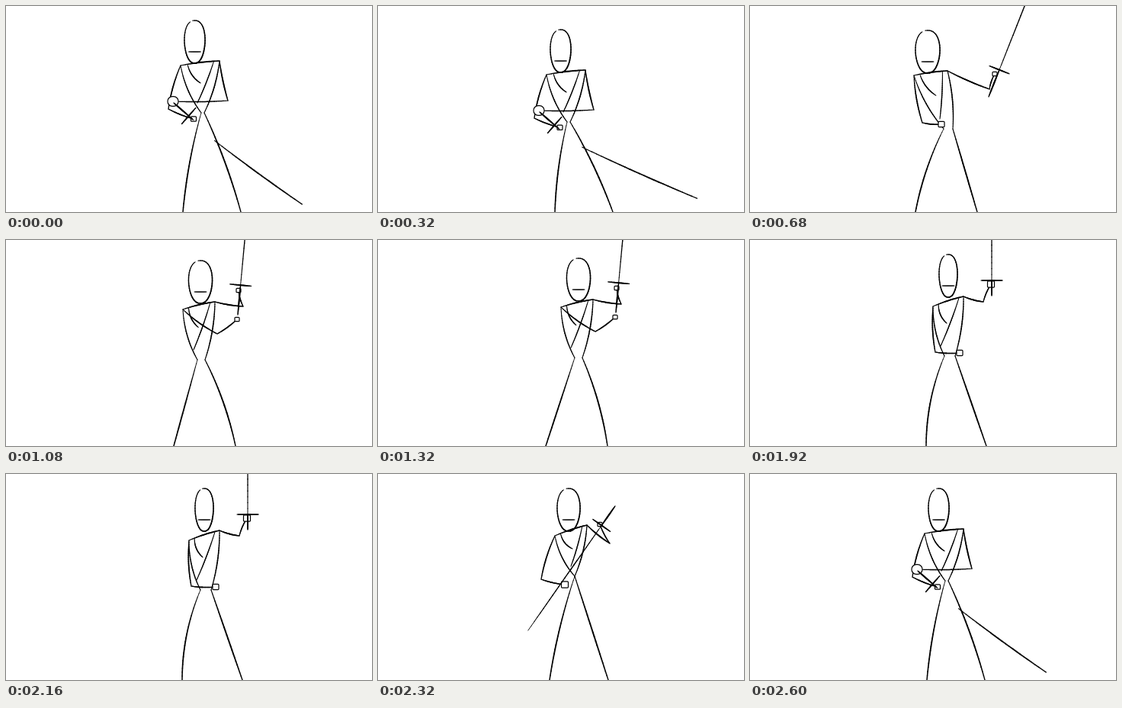
Animation of 480x270 px, one loop 2640 ms. Source, as an HTML page with a canvas:

```html
<!DOCTYPE html>
<html lang="en">
<head>
<meta charset="utf-8">
<title>Sword practice</title>
<style>
  html, body { margin: 0; width: 100%; height: 100%; overflow: hidden; background: #fff; }
  canvas { display: block; width: 480px; height: 270px; }
</style>
</head>
<body>
<canvas id="stage" width="480" height="270"></canvas>
<script>
const ctx = document.getElementById('stage').getContext('2d');
const LOOP = 2640, FLOOR = 270;

// A pose is a few joints; every stroke is derived from them.
// head: x, y, half width       hip: x, y, half spread
// handL, handR: x, y, size     legL, legR: foot x, outward bend
// sheath: degrees, length      sword: pommel x, y, degrees, grip, length
const rest = {
  head: [247.5, 47, 13.5], shoulderL: [229, 78], shoulderR: [280, 72], hip: [258, 140, 2],
  elbowL: [213, 135], handL: [246, 148, 7], elbowR: [291, 124], handR: [219, 125, 14],
  legL: [232, 3], legR: [308, 3], sheath: [36, 142], sword: [220, 127, 41, 26, 34],
};
const lunge = {
  head: [233, 60, 16], shoulderL: [215, 91], shoulderR: [259, 85], hip: [260, 161, 6],
  elbowL: [226, 153], handL: [251, 155, 8], elbowR: [314, 109], handR: [321, 89, 6],
  legL: [217, 4], legR: [298, 0], sheath: [36, 0], sword: [313, 119, 291.6, 38, 205],
};
const raise = {
  head: [255, 55, 15.5], shoulderL: [232, 91], shoulderR: [274, 81], hip: [256, 157, 5],
  elbowL: [277, 123], handL: [303, 104, 6], elbowR: [311, 87], handR: [305, 66, 6],
  legL: [220, 0], legR: [301, 4], sheath: [36, 0], sword: [304, 98, 275.3, 39, 205],
};
const strike = {
  head: [246, 130, 14], shoulderL: [219, 139], shoulderR: [254, 155], hip: [238, 205, 5],
  elbowL: [193, 176], handL: [198, 196, 4], elbowR: [262, 177], handR: [174, 201, 9],
  legL: [200, 16], legR: [313, -4], sheath: [36, 0], sword: [198, 198, 164.3, 33, 207],
};
const salute = {
  head: [260, 47, 12], shoulderL: [240, 87], shoulderR: [280, 74], hip: [262, 152, 7],
  elbowL: [243, 147], handL: [275, 148, 8], elbowR: [306, 81], handR: [316, 58, 9],
  legL: [231, 6], legR: [310, 0], sheath: [36, 0], sword: [317, 73, 270, 20, 205],
};
const sheathe = {
  head: [250, 47, 15], shoulderL: [232, 81], shoulderR: [274, 67], hip: [258, 134, 0],
  elbowL: [214, 138], handL: [245, 145, 9], elbowR: [304, 91], handR: [291, 66, 6],
  legL: [225, 3], legR: [302, 0], sheath: [36, 0], sword: [311, 42, 125, 31, 199],
};

// Moves the upper body while the feet stay planted.
function lean(pose, dx, dy) {
  const result = { ...pose };
  for (const name of Object.keys(pose)) {
    if (/leg|sheath/.test(name)) continue;
    const [x, y, ...others] = pose[name];
    const weight = Math.min(1, (FLOOR - y) / 130);
    result[name] = [x + dx * weight, y + dy * weight, ...others];
  }
  return result;
}

const crouch = { ...lean(rest, -8, 12), sheath: [24, 165] };
const drawn = {
  ...crouch, sheath: [24, 0],
  elbowR: [250, 128], handR: [204, 125, 9], sword: [212, 127, 190, 30, 205],
};
const guard = { ...lean(lunge, 4, 2), sword: [315, 119, 281, 38, 205] };
const sweep = { ...lunge, sword: [304, 111, 355, 36, 205] };

const keys = [
  [0, rest], [160, rest], [320, crouch], [480, crouch], [640, drawn], [680, lunge],
  [840, guard], [1000, guard], [1080, raise], [1320, lean(raise, 8, -3)], [1560, strike],
  [1640, lean(strike, -2, 3)], [1800, sweep], [1920, salute], [2080, lean(salute, -3, 2)],
  [2160, salute], [2320, sheathe], [2600, rest], [LOOP, rest],
];

// Drawings change in runs of [start, interval, count]; the last one of a run holds.
const runs = [
  [0, 80, 1], [240, 80, 2], [560, 40, 3], [680, 80, 3], [1080, 80, 4],
  [1400, 40, 2], [1480, 80, 2], [1640, 80, 4], [1920, 80, 9], [2600, 80, 1],
];

const mix = (a, b, u) => a + (b - a) * u;
const mixAll = (a, b, u) => a.map((v, i) => mix(v, b[i], u));

// Follows curve(u) for u from 0 to 1 with a brush that thins at both ends.
function ink(curve, w0, w1, segments = 24) {
  for (let i = 0; i < segments; i++) {
    const u = i / segments;
    ctx.lineWidth = mix(w0, w1, u) * (0.65 + 0.35 * Math.sin(Math.PI * u));
    ctx.beginPath();
    ctx.moveTo(...curve(u));
    ctx.lineTo(...curve(u + 1 / segments));
    ctx.stroke();
  }
}

// A stroke from a to b; a positive bow bulges right on the way down.
function arc(a, b, bow = 0, w0 = 1.4, w1 = 1.6) {
  const dx = b[0] - a[0], dy = b[1] - a[1], length = Math.hypot(dx, dy) || 1;
  ink(u => {
    const bulge = 4 * bow * u * (1 - u) / length;
    return [a[0] + dx * u + dy * bulge, a[1] + dy * u - dx * bulge];
  }, w0, w1);
}

function polar([x, y], degrees, length) {
  const angle = degrees * Math.PI / 180;
  return [x + Math.cos(angle) * length, y + Math.sin(angle) * length];
}

function drawHead([x, y, rx]) {
  const ry = 28;
  ctx.beginPath();
  ctx.ellipse(x, y, rx * 0.9, ry * 0.9, 0, 0, 7);
  ctx.fill();
  ink(u => {
    const angle = mix(-1.7, 4.35, u), c = Math.cos(angle), s = Math.sin(angle);
    const side = Math.sign(c) * Math.abs(c) ** 0.85 * (1 - 0.08 * s);
    return [x + rx * side, y + ry * s];
  }, 1.9, 1.6, 48);
  arc([x - 8, y + 13], [x + 8, y + 13], 0, 1.2, 1.2);
}

function drawHand([x, y, size]) {
  const height = size * 0.9;
  ctx.lineWidth = 1.2;
  ctx.beginPath();
  ctx.roundRect(x - size / 2, y - height / 2, size, height, Math.max(1, size - 8));
  ctx.fill();
  ctx.stroke();
}

function drawSword([x, y, degrees, grip, length]) {
  const hilt = polar([x, y], degrees, grip);
  arc([x, y], hilt, 0, 2, 2);
  arc(hilt, polar([x, y], degrees, length), 0, 1.5, 1.3);
  arc(polar(hilt, degrees - 90, 14), polar(hilt, degrees + 90, 14), 0, 1.8, 1.8);
}

function drawFigure(p) {
  const { shoulderL, shoulderR, elbowL, elbowR, handL, handR } = p;
  const [hipX, hipY, spread] = p.hip;
  const hipL = [hipX - spread, hipY], hipR = [hipX + spread, hipY];
  const footL = [p.legL[0], FLOOR], footR = [p.legR[0], FLOOR];
  const along = u => mixAll(shoulderL, shoulderR, u);

  if (p.sheath[1] > 1) {
    const top = mixAll(hipR, footR, 0.28);
    arc(top, polar(top, ...p.sheath), -1, 1.6, 1.9);
  }
  arc(hipL, footL, -p.legL[1], 1.3, 2.2);
  arc(hipR, footR, p.legR[1], 1.8, 2);

  arc(shoulderL, shoulderR, 1, 1.5, 2.1);
  arc(along(0.18), mixAll(along(0.5), hipL, 0.4), -3);
  arc(shoulderL, hipL, -4);
  arc(along(0.85), [hipL[0] - 5, hipL[1] - 13], 1, 1.4, 1.5);
  arc(shoulderR, hipR, 3, 1.7, 1.5);
  drawHead(p.head);

  arc(shoulderL, elbowL, -2, 1.6, 1.8);
  arc(elbowL, handL, -1, 1.8, 1.5);
  arc(shoulderR, elbowR, -1, 1.8, 1.9);
  arc(elbowR, handR, 1, 1.6, 1.4);
  drawHand(handL);
  drawHand(handR);
  drawSword(p.sword);
}

function poseAt(time) {
  const [start, interval, count] = runs.findLast(run => run[0] <= time);
  const tick = start + interval * Math.min(count - 1, Math.floor((time - start) / interval));
  const k = keys.findLastIndex(([t]) => t <= tick);
  const [t0, a] = keys[k], [t1, b] = keys[k + 1];
  const u = (tick - t0) / (t1 - t0);
  return Object.fromEntries(Object.keys(a).map(name => [name, mixAll(a[name], b[name], u)]));
}

ctx.fillStyle = '#fff';
ctx.strokeStyle = '#000';
ctx.lineCap = 'round';
const begin = performance.now();
function frame() {
  ctx.fillRect(0, 0, 480, 270);
  drawFigure(poseAt((performance.now() - begin) % LOOP));
  requestAnimationFrame(frame);
}
frame();
</script>
</body>
</html>
```
